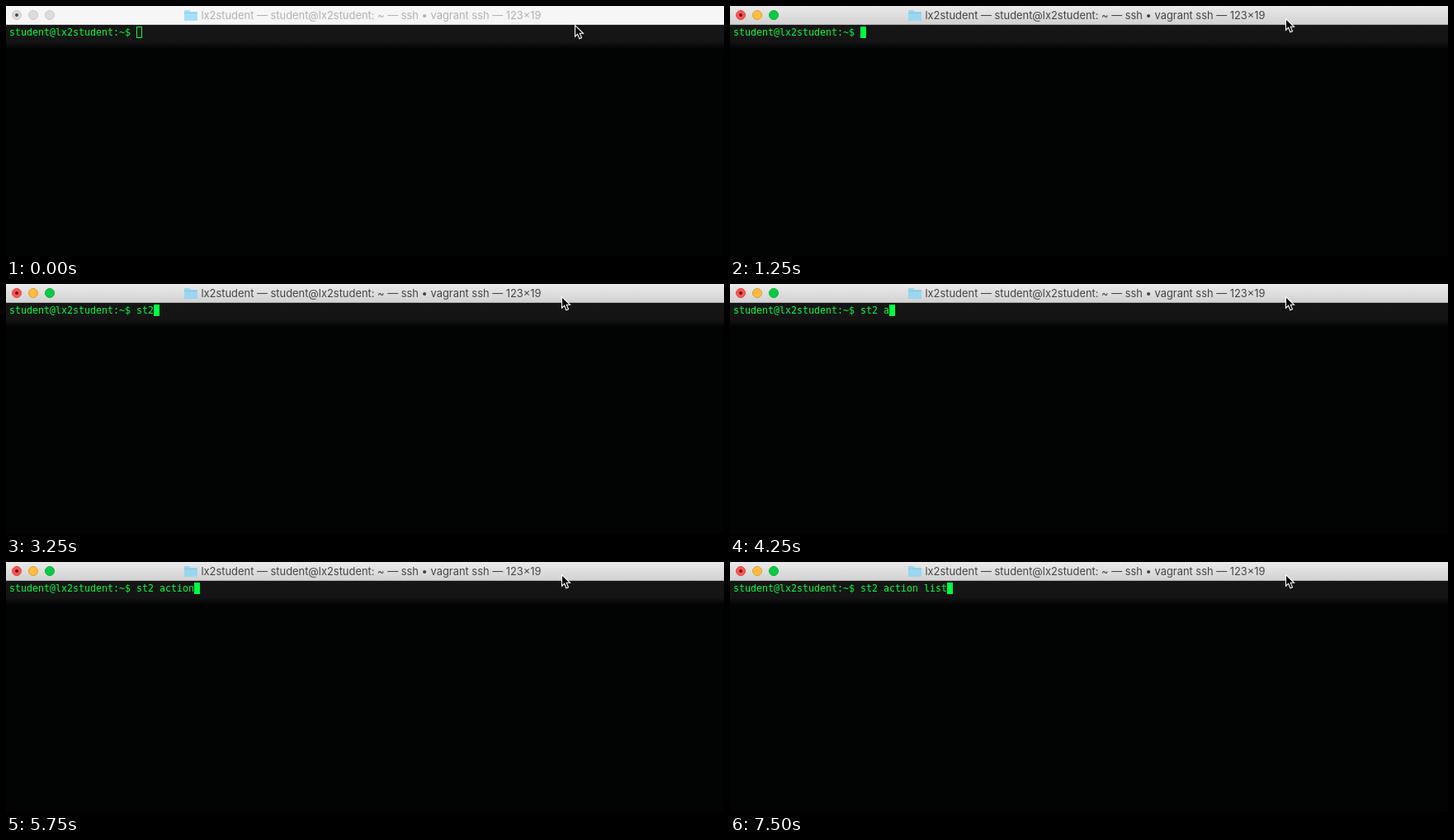
These frames come from a looping animation (870 by 304 pixels, 8000 ms). An HTML page:

```html
<!DOCTYPE html>
<html lang="en">
<head>
<meta charset="utf-8">
<title>Terminal</title>
<style>
  html, body { margin: 0; width: 870px; height: 304px; overflow: hidden; background: #020303; }
  svg { display: block; }
  #title { font: 12.9px Inter, "Open Sans", sans-serif; fill: #b2b2b2; text-anchor: middle; }
  #line { font: 11.63px "DejaVu Sans Mono", monospace; fill: #00ff41; white-space: pre; }
  #bar { fill: #f6f6f6; }
  .edge { fill: #d4d4d4; }
  .light { fill: #dcdcdc; stroke: #c9c9c9; }
  #dot { fill: #4a4a4a; }
  #folder { fill: #a5e0f8; }
  #caret { fill: none; stroke: #00ff41; }
  .active #title { fill: #454545; }
  .active #bar { fill: url(#metal); }
  .active .edge { fill: #b0b0b0; }
  .active .red { fill: #fc5652; stroke: #df4744; }
  .active .yellow { fill: #fdbc40; stroke: #de9f34; }
  .active .green { fill: #08cb45; stroke: #10ad35; }
  .active #dot { fill: #74100d; }
  .active #folder { fill: #9ad6ef; }
  .active #caret { fill: #00ff41; }
</style>
</head>
<body>
<svg id="stage" width="870" height="304" viewBox="0 0 870 304">
  <defs>
    <linearGradient id="metal" x2="0" y2="1">
      <stop stop-color="#eaeaea"/><stop offset="1" stop-color="#d1d1d1"/>
    </linearGradient>
    <linearGradient id="glow" x2="0" y2="1">
      <stop stop-color="#161616"/><stop offset=".7" stop-color="#141414"/><stop offset="1" stop-color="#020303"/>
    </linearGradient>
  </defs>
  <rect width="870" height="304" fill="#020303"/>
  <rect y="23" width="870" height="29" fill="url(#glow)"/>
  <rect id="bar" width="870" height="23"/>
  <rect class="edge" y="22" width="870" height="1"/>
  <circle class="light red" cx="13" cy="11" r="5.5"/>
  <circle class="light yellow" cx="33" cy="11" r="5.5"/>
  <circle class="light green" cx="53" cy="11" r="5.5"/>
  <circle id="dot" cx="13" cy="11" r="2"/>
  <g id="folder">
    <path d="M216 6q0-1 1-1h5l2 2h7q1 0 1 1v9q0 1-1 1h-14q-1 0-1-1z"/>
    <path d="M216 8.5h16" stroke="#74bfe0" stroke-opacity=".6"/>
  </g>
  <text id="title" x="442.5" y="16">lx2student — student@lx2student: ~ — ssh • vagrant ssh — 123×19</text>
  <text id="line" x="4" y="36"></text>
  <rect id="caret" y="25.5" width="6" height="13"/>
  <path id="mouse" d="M.5.5V14.2L3.6 11.3 5.9 16.7 8.5 15.6 6.2 10.3H10.5Z" fill="#000" stroke="#fff" stroke-width="1.1"/>
</svg>
<script>
const $ = id => document.getElementById(id);
const LOOP = 8000, CELL = 7, START = 158;
const prompt = "student@lx2student:~$ ", command = "st2 action list";

// [time, value] steps, each held until the next
const typed = [[0, 0], [3000, 1], [3250, 3], [3750, 4], [4250, 5], [5250, 6],
  [5750, 10], [6750, 12], [7000, 13], [7250, 14], [7500, 15]];
const mouse = [[0, "689 23"], [250, "673 9"], [750, "673 15"]];
const caretOn = [[0, 1], [1750, 0], [2250, 1], [2750, 0], [3000, 1]];
const at = (steps, t) => steps.findLast(s => s[0] <= t)[1];

function draw(now) {
  const t = now % LOOP, count = at(typed, t);
  $("stage").classList.toggle("active", t >= 1250);
  $("line").textContent = prompt + command.slice(0, count);
  $("caret").setAttribute("x", START + count * CELL + .5);
  $("caret").style.opacity = at(caretOn, t);
  $("mouse").setAttribute("transform", `translate(${at(mouse, t)})`);
  requestAnimationFrame(draw);
}
draw(0);
</script>
</body>
</html>
```
